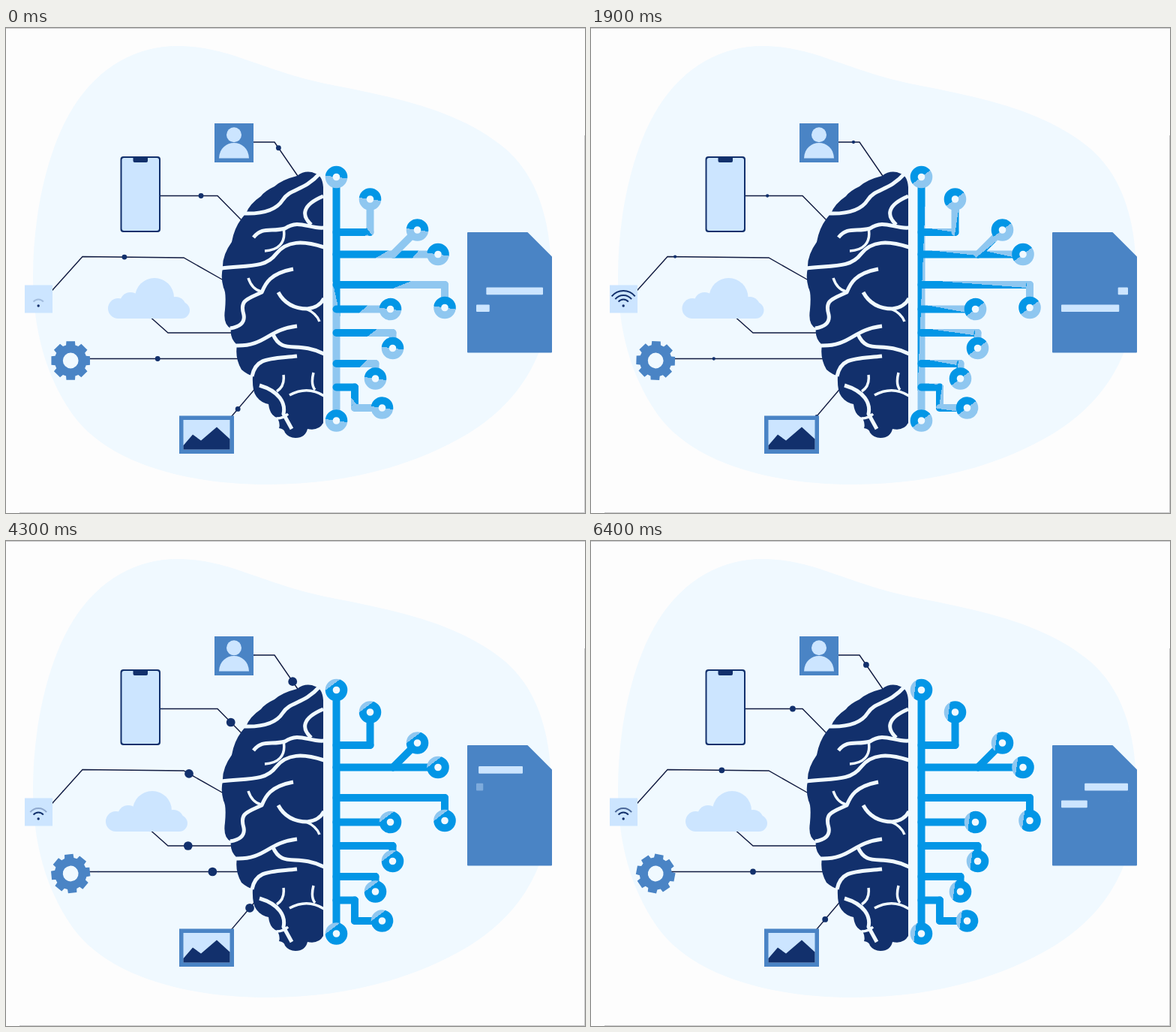
An HTML page that plays this animation: 772 by 646 pixels, repeating every 6.5 s.

```html
<!DOCTYPE html>
<html lang="en">
<head>
<meta charset="utf-8">
<title>Connected brain</title>
<style>
  html, body { margin: 0; width: 100%; height: 100%; overflow: hidden; background: #fdfdfd; }
  svg { display: block; width: 100vw; height: 100vh; }
</style>
</head>
<body>
<svg viewBox="0 0 772 646">
  <defs id="defs"></defs>
  <rect width="772" height="646" fill="#fdfdfd"/>
  <path d="M0 .5H772M771.5 143V646M18 645.5H772" stroke="#c9c9cb" fill="none"/>
  <path fill="#f0f9ff" d="M36 330C36 250 55 160 90 105C125 50 175 24 228 24C300 24 340 58 440 77C540 96 610 115 665 160C715 203 728 270 727 340C726 430 690 495 615 541C540 585 450 608 350 608C230 608 132 575 89 515C52 462 36 400 36 330Z"/>

  <g id="lines" fill="none" stroke="#111b41" stroke-width="1.4"></g>
  <g id="dots" fill="#12306c"></g>

  <path fill="#12306c" d="M423 212Q422 197 413 194Q400 188 388 197Q368 202 358 211Q345 217 340 224Q325 234 320 247Q305 262 301 285Q288 303 289 320Q286 332 290 346Q294 352 292 375Q289 395 300 400Q298 413 308 422Q305 440 314 455Q322 462 329 463Q328 484 334 491Q340 499 350 501Q352 517 362 519Q366 528 364 533Q371 534 372 539Q377 546 386 546Q399 546 402 534Q417 537 423 526Z"/>
  <g fill="none" stroke="#f0f9ff" stroke-linejoin="round">
    <path stroke-width="5" d="M318 247C348 248 362 240 369 229C378 214 398 217 418 194M423 224C394 236 394 250 407 262M330 279C342 264 354 272 372 267C390 254 404 268 424 266M287 320C322 316 346 320 360 301C374 283 396 283 424 292M383 321C352 327 346 340 341 352C322 361 311 362 317 382C319 393 311 398 299 400M363 352Q375 374 402 374Q418 372 424 360M307 423C346 424 348 402 388 397M356 408C368 436 388 416 424 434M328 464C333 438 352 441 388 437M338 476C365 484 373 500 370 514L381 534"/>
    <path stroke-width="3.500" d="M370 267C374 287 362 296 345 297M340 351Q328 348 323 333M400 374Q414 380 418 391M361 484Q372 477 370 462M424 490Q402 476 378 489M410 459Q406 475 412 482M376 514Q370 520 361 520"/>
  </g>

  <g id="wires" fill="none" stroke-width="10" stroke-linecap="round"></g>
  <g id="nodes" fill="#f0f9ff" stroke-width="10"></g>

  <path fill="#4a84c5" stroke="#4a84c5" stroke-width="2" stroke-linejoin="round" d="M616 273H695L727 305V431.5H616Z"/>
  <g id="rows" fill="#cce5ff"></g>

  <rect x="278" y="127" width="52" height="52" fill="#4a84c5"/>
  <circle cx="304" cy="142.3" r="10" fill="#cce5ff"/>
  <path d="M284 173.5C285 146 323 146 324 173.5Z" fill="#cce5ff"/>

  <rect x="152.5" y="171" width="53.5" height="101" rx="4" fill="#12306c"/>
  <rect x="154.5" y="173" width="49.5" height="97" rx="3" fill="#cce5ff"/>
  <path d="M169.5 172H189V177Q189 179 187 179H171.5Q169.5 179 169.5 177Z" fill="#12306c"/>

  <rect x="25" y="342.5" width="37" height="37" fill="#cce5ff"/>
  <circle cx="43.2" cy="370" r="1.7" fill="#12306c"/>
  <g id="wifi" fill="none" stroke="#12306c" stroke-width="2"></g>

  <g id="cloud" fill="#cce5ff">
    <circle cx="13.5" cy="373.5" r="13.5"/>
    <circle cx="30" cy="366" r="14"/>
    <circle cx="62" cy="359" r="26"/>
    <circle cx="90" cy="372" r="14"/>
    <circle cx="98" cy="376" r="11"/>
    <rect x="13" y="362" width="85" height="25"/>
  </g>

  <path id="gear" fill="#4a84c5" fill-rule="evenodd"/>

  <rect x="231" y="516.5" width="73" height="50.5" fill="#4a84c5"/>
  <rect x="236.5" y="522" width="62" height="39.5" fill="#cce5ff"/>
  <path d="M236.5 561.5V556L249 541.5L260 549.5L281 531.5L298.5 547.5V561.5Z" fill="#12306c"/>
</svg>
<script>
const $ = id => document.getElementById(id);
const LOOP = 6500, STEP = 100, BASE = 5000;
const clamp = v => Math.max(0, Math.min(1, v));

function set(el, attrs) {
  for (const key in attrs) el.setAttribute(key, attrs[key]);
}
function make(parent, tag, attrs = {}) {
  const el = document.createElementNS('http://www.w3.org/2000/svg', tag);
  set(el, attrs);
  return parent.appendChild(el);
}

// Connectors: dots leave the brain, travel `reach` along the path and shrink.
const STARTS = [510, 2520, 3978], LIFE = 2000;
const dots = [];
function connect(d, reach, from = 0) {
  const path = make($('lines'), 'path', { d });
  for (const start of STARTS) {
    dots.push({ path, reach, from, start, el: make($('dots'), 'circle') });
  }
}
connect('M321 152H358L391 200', 95);
connect('M194 223.5H282L315 257', 135);
connect('M58 353.5L102 304.5L237 306L290 336', 249);
connect('M180 374L216 406H302', 367, -233);
connect('M100 440.5H309', 209);
connect('M287 533.5L332.5 480', 70);

// Circuit parts are two-tone; the split turns in each part's own unit square.
const tones = [];
function tone(matrix, isWire) {
  const id = 'tone' + tones.length;
  const grad = make($('defs'), 'linearGradient', {
    id, gradientUnits: 'userSpaceOnUse', x1: .5, y1: .5,
    gradientTransform: `matrix(${matrix.join(' ')})`
  });
  const stops = ['#0396e6', '#8fc7f0'].map(c => make(grad, 'stop', { 'stop-color': c }));
  tones.push({ grad, stops, isWire });
  return `url(#${id})`;
}
function node(cx, cy, r = 14.8) {
  make($('nodes'), 'circle', {
    cx, cy, r: r - 5, stroke: tone([2 * r, 0, 0, 2 * r, cx - r, cy - r], false)
  });
}
// The unit square of a wire is its length by its thickness, bent round corners.
function wire(x, y, ...moves) {
  const total = moves.reduce((sum, m) => sum + Math.hypot(...m), 0);
  let done = 0;
  for (const [dx, dy] of moves) {
    const len = Math.hypot(dx, dy), ux = dx / len, uy = dy / len;
    make($('wires'), 'path', {
      d: `M${x} ${y}l${dx} ${dy}`,
      stroke: tone([ux * total, uy * total, -uy * 10, ux * 10,
        x - ux * done + uy * 5, y - uy * done - ux * 5], true)
    });
    x += dx;
    y += dy;
    done += len;
  }
  node(x, y);
}
const TRUNK = 440.5;
wire(TRUNK, 198.5, [0, 324.5]);
node(TRUNK, 198.5);
wire(TRUNK, 272, [45, 0], [0, -44]);
wire(516, 301.5, [60, 0]);
wire(TRUNK, 301.5, [75.5, 0], [32.5, -32.5]);
wire(TRUNK, 342, [144.5, 0], [0, 30.5]);
wire(TRUNK, 374.5, [72, 0]);
wire(TRUNK, 406, [75, 0], [0, 20.5]);
wire(TRUNK, 447, [52, 0], [0, 20]);
wire(TRUNK, 478.5, [24.5, 0], [0, 27.5], [36.5, 0]);

const rows = [62, 89, 89, 89].map((width, i) => ({
  width, el: make($('rows'), 'rect', { y: 300 + 22.8 * i, height: 9.7, rx: 1 })
}));

const arcs = [8.5, 14, 20].map(r => {
  const dx = r * Math.sin(.89), y = 370 - r * Math.cos(.89);
  return make($('wifi'), 'path', { d: `M${43.2 - dx} ${y}A${r} ${r} 0 0 1 ${43.2 + dx} ${y}` });
});

function gearPath(teeth = 8) {
  const pts = [];
  for (let i = 0; i < teeth; i++) {
    for (const [r, a] of [[21.5, -.29], [26.4, -.22], [26.4, .22], [21.5, .29]]) {
      const q = i * 2 * Math.PI / teeth + a;
      pts.push(`${r * Math.cos(q)} ${r * Math.sin(q)}`);
    }
  }
  return `M${pts.join('L')}ZM10.4 0A10.4 10.4 0 1 0 -10.4 0A10.4 10.4 0 1 0 10.4 0Z`;
}
$('gear').setAttribute('d', gearPath());

function drawDots(t) {
  for (const { path, reach, from, start, el } of dots) {
    const p = clamp(1 - (t - start + 2 * BASE) % BASE / LIFE);
    const { x, y } = path.getPointAtLength(Math.max(0, from + reach * p));
    set(el, { cx: x, cy: y, r: 7 * p });
  }
}

function drawCircuit(t) {
  const phase = (t / 1000 + .6) % 1 - .6;
  const shift = 4.6 * Math.max(0, Math.abs(phase + .15) - .2) ** 2;
  for (const { grad, stops, isWire } of tones) {
    const a = (98 + 450 * phase - (isWire ? 90 : 0)) * Math.PI / 180;
    set(grad, { x2: .5 + Math.cos(a), y2: .5 + Math.sin(a) });
    stops.forEach(s => s.setAttribute('offset', isWire ? 3 * shift : shift));
  }
}

// Each row grows to the right, then empties while the next one grows.
function drawRows(t) {
  const u = (t * .003 + 3.15) % 5;
  rows.forEach(({ width, el }, i) => {
    const grow = i ? clamp(u - i) : clamp((u - .3) / .65);
    const gone = u - i - 1;
    const left = width * Math.min(.97, clamp(gone));
    const right = Math.min(width, 5 + grow * (width - 4));
    set(el, {
      x: 627 + left, width: Math.max(0, right - left),
      opacity: Math.min(clamp(grow * 8), clamp((1.1 - gone) * 10))
    });
  });
}

function drawWifi(t) {
  const phase = (t / 1000 + .06) % 1;
  arcs.forEach((el, i) => el.setAttribute('opacity', clamp(phase / .27 - i)));
}

function draw(t) {
  drawDots(t);
  drawCircuit(t);
  drawRows(t);
  drawWifi(t);
  const turn = t / BASE;
  set($('cloud'), { transform: `translate(${127.6 + 8.4 * Math.cos(turn * 2 * Math.PI)} 0)` });
  set($('gear'), { transform: `translate(86.2 443) rotate(${turn * 360})` });
}

const begin = performance.now();
function tick() {
  const t = (performance.now() - begin) % LOOP;
  draw(Math.floor(t / STEP) * STEP);
  requestAnimationFrame(tick);
}
tick();
</script>
</body>
</html>
```
